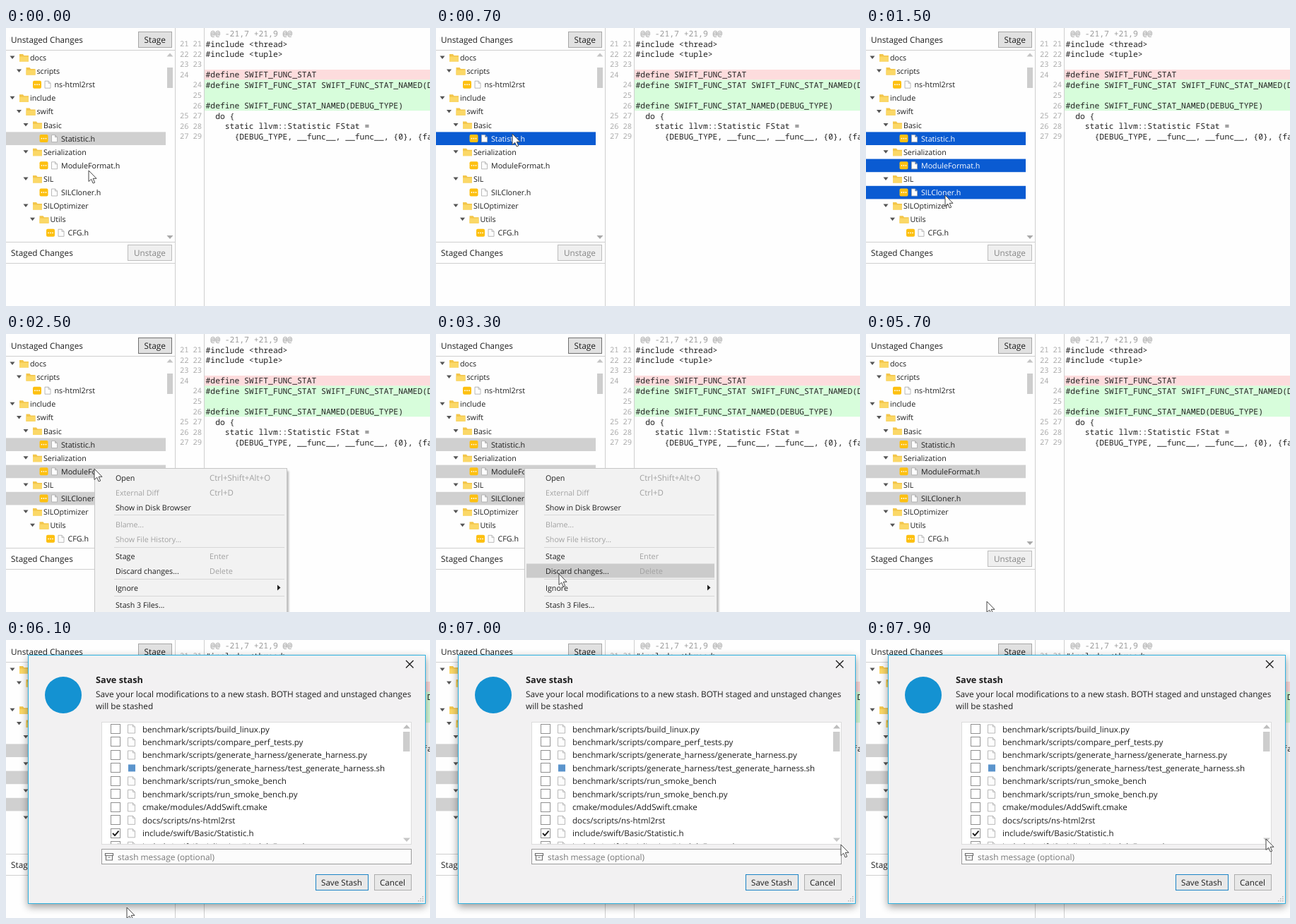
These frames come from a looping animation (600 by 394 pixels, 8 s). An HTML page:

```html
<!DOCTYPE html>
<html lang="en">
<head>
<meta charset="utf-8">
<title>Stash selected files</title>
<style>
html, body { margin: 0; width: 100%; height: 100%; overflow: hidden; background: #fff; }
svg { display: block; width: 600px; height: 394px; }
text { font-family: "Open Sans", "Noto Sans", sans-serif; white-space: pre; text-rendering: geometricPrecision; }
.mono { font-family: "Noto Sans Mono", "DejaVu Sans Mono", monospace; }
svg * { animation: 8s step-end infinite; }

.Statistic { animation-name: pick1; }
.ModuleFormat { animation-name: pick2; }
.SILCloner { animation-name: pick3; }
.menu { animation-name: menu; }
.hover { animation-name: hover; }
.dialog { animation-name: dialog; }
.stage { animation-name: stage; }
.cursor { animation-name: cursor; }

@keyframes pick1 {
  0%, 27.5%, 100% { color: #d0d0d0; fill: #1e1e1e; }
  8.75% { color: #0a5bd2; fill: #fff; }
}
@keyframes pick2 {
  0%, 100% { color: transparent; fill: #1e1e1e; }
  13.75% { color: #0a5bd2; fill: #fff; }
  27.5% { color: #d0d0d0; fill: #1e1e1e; }
}
@keyframes pick3 {
  0%, 100% { color: transparent; fill: #1e1e1e; }
  17.5% { color: #0a5bd2; fill: #fff; }
  27.5% { color: #d0d0d0; fill: #1e1e1e; }
}
@keyframes menu {
  0%, 67.5%, 100% { visibility: hidden; }
  27.5% { visibility: visible; }
}
@keyframes stage {
  0%, 67.5%, 100% { stroke: #a6a6a6; }
  27.5% { stroke: #707070; }
}
@keyframes dialog {
  0% { visibility: hidden; }
  72.5%, 100% { visibility: visible; }
}
/* the menu bar follows the pointer; disabled items do not light up */
@keyframes hover {
  0%, 33.75%, 36.25% { transform: translateY(-400px); }
  32.5% { transform: translateY(194px); }
  35% { transform: translateY(236px); }
  38.75% { transform: translateY(304.5px); }
  40% { transform: translateY(325.5px); }
  46.25% { transform: translateY(349.5px); }
  50%, 100% { transform: translateY(373.5px); }
}
@keyframes cursor {
  0% { transform: translate(117px, 202px); animation-timing-function: steps(6); }
  7.5% { transform: translate(108px, 150px); }
  11.25% { transform: translate(108px, 150px); animation-timing-function: steps(2); }
  13.75% { transform: translate(111px, 196px); }
  15% { transform: translate(111px, 196px); animation-timing-function: steps(2); }
  17.5% { transform: translate(112px, 237px); }
  20% { transform: translate(112px, 237px); animation-timing-function: steps(3); }
  23.75% { transform: translate(125px, 191px); }
  31.25% { transform: translate(125px, 191px); animation-timing-function: steps(7); }
  40% { transform: translate(174px, 340px); }
  41.25% { transform: translate(174px, 340px); animation-timing-function: steps(3); }
  45% { transform: translate(173px, 347px); animation-timing-function: steps(5); }
  51.25% { transform: translate(171px, 379px); }
  77.5% { transform: translate(171px, 379px); animation-timing-function: steps(3); }
  81.25% { transform: translate(310px, 350px); animation-timing-function: steps(5); }
  87.5% { transform: translate(573px, 290px); }
  88.75% { transform: translate(573px, 290px); animation-timing-function: steps(4); }
  93.75% { transform: translate(567px, 283px); }
  95% { transform: translate(567px, 283px); animation-timing-function: steps(3); }
  98.75%, 100% { transform: translate(566px, 282px); }
}
</style>
</head>
<body>
<script>
const text = (x, y, s, size, fill, more = '') =>
  `<text x="${x}" y="${y}" font-size="${size}" ${fill ? `fill="${fill}"` : ''} ${more}>${s.replace(/</g, '&lt;')}</text>`;
const rect = (x, y, w, h, fill, more = '') =>
  `<rect x="${x}" y="${y}" width="${w}" height="${h}" fill="${fill}" ${more}/>`;
const box = (x, y, w, h, fill, stroke, more = '') =>
  rect(x + .5, y + .5, w - 1, h - 1, fill, `stroke="${stroke}" ${more}`);
const path = (d, fill, more = '') => `<path d="${d}" fill="${fill}" ${more}/>`;
const page = (x, y, w, h) =>
  path(`M${x} ${y}h${w - 3}l3 3v${h - 3}h${-w}zM${x + w - 3} ${y}v3h3`, '#fdfdfd', 'stroke="#a9a9a9" stroke-width=".8"');

const INK = '#1e1e1e', DIM = '#a2a2a2';

// file tree
const tree = [
  [0, 'docs'], [1, 'scripts'], [2, 'ns-html2rst', 1], [0, 'include'], [1, 'swift'],
  [2, 'Basic'], [3, 'Statistic.h', 1], [2, 'Serialization'], [3, 'ModuleFormat.h', 1],
  [2, 'SIL'], [3, 'SILCloner.h', 1], [2, 'SILOptimizer'], [3, 'Utils'], [4, 'CFG.h', 1]
];

function treeRow([depth, name, file], i) {
  const y = 42 + 19.1 * i, x = 19 + 9.5 * depth;
  if (!file) {
    return path(`M${x - 13.5} ${y - 2.5}h7l-3.5 4.5z`, '#555') +
      path(`M${x} ${y - 5}h5l1.5 2h6.5v8.5h-13z`, '#f3c64b') +
      rect(x, y - 1.5, 13, 7, '#fbd867') +
      text(x + 15, y + 4, name, 10.7, INK);
  }
  const dots = [3, 6, 9].map(d => `<circle cx="${x + d}" cy="${y}" r=".9" fill="#fff"/>`).join('');
  return `<g class="${name.split('.')[0]}" fill="${INK}" color="transparent">` +
    rect(0, y - 9.2, 226, 18.6, 'currentColor') +
    rect(x, y - 5.5, 12, 11, '#fdc010', 'rx="2"') + dots +
    page(x + 17, y - 5, 8, 10) +
    text(x + 30.5, y + 4, name, 10.7) + '</g>';
}

const left =
  text(7, 21, 'Unstaged Changes', 11.7, INK) +
  box(187, 5, 48, 23, '#e1e1e1', '#a6a6a6', 'class="stage"') +
  text(195.5, 21, 'Stage', 11.9, INK) +
  rect(0, 31, 239, 1, '#cfcfcf') +
  tree.map(treeRow).join('') +
  path('M227.5 40.5h9l-4.5-5z', '#c4c4c4') +
  rect(228, 56, 8, 29, '#cdcdcd') +
  path('M227.5 294h9l-4.5 5z', '#a9a9a9') +
  rect(0, 303, 239, 1, '#cfcfcf') +
  text(7, 323, 'Staged Changes', 11.8, INK) +
  box(172, 307, 63, 23, '#efefef', '#bdbdbd') +
  text(181, 323, 'Unstage', 11.7, '#858585') +
  rect(0, 333, 239, 1, '#cfcfcf') +
  rect(239, 0, 1, 394, '#cfcfcf');

// diff
const code = [
  ['', '', ' @@ -21,7 +21,9 @@'],
  [21, 21, '#include <thread>'],
  [22, 22, '#include <tuple>'],
  [23, 23, ''],
  [24, '', '#define SWIFT_FUNC_STAT'],
  ['', 24, '#define SWIFT_FUNC_STAT SWIFT_FUNC_STAT_NAMED(DEBUG_TYPE)'],
  ['', 25, ''],
  ['', 26, '#define SWIFT_FUNC_STAT_NAMED(DEBUG_TYPE)'],
  [25, 27, '  do {'],
  [26, 28, '    static llvm::Statistic FStat ='],
  [27, 29, '      {DEBUG_TYPE, __func__, __func__, {0}, {false}};']
];
const diff =
  rect(281, 59, 319, 14.6, '#fddcdd') +
  rect(281, 73.4, 319, 43.8, '#d7fddb') +
  rect(280, 0, 1, 394, '#cfcfcf') +
  code.map(([a, b, s], i) => {
    const y = 12 + 14.58 * i;
    return text(246, y - .5, String(a), 10.6, '#adadad', 'class="mono"') +
      text(264.5, y - .5, String(b), 10.6, '#adadad', 'class="mono"') +
      text(282.5, y, s, 11.37, i ? '#222' : '#9a9a9a', 'class="mono"');
  }).join('');

// context menu: baseline, label, shortcut, disabled
const items = [
  [208, 'Open', 'Ctrl+Shift+Alt+O'], [229, 'External Diff', 'Ctrl+D', 1], [250, 'Show in Disk Browser', ''],
  [274, 'Blame...', '', 1], [295, 'Show File History...', '', 1],
  [318.5, 'Stage', 'Enter'], [340, 'Discard changes...', 'Delete'],
  [363.5, 'Ignore', ''], [387.5, 'Stash 3 Files...', '']
];
const menu = '<g class="menu" visibility="hidden">' +
  rect(129, 194, 271, 210, '#000', 'opacity=".28" filter="url(#soft)"') +
  box(125, 190, 273, 220, '#f2f2f2', '#c6c6c6') +
  rect(128, 0, 266, 20, '#cbcbcb', 'class="hover"') +
  [256, 302, 347, 371].map(y => rect(153, y, 241, 1, '#d7d7d7')).join('') +
  items.map(([y, label, keys, off]) =>
    text(155, y, label, 10.7, off ? DIM : INK) +
    text(288, y, keys, keys.includes('+') ? 11.5 : 10.9, DIM)).join('') +
  path('M384 355.5l4.5 4-4.5 4z', INK) + '</g>';

// stash dialog
const bench = 'benchmark/scripts/';
const files = [
  bench + 'build_linux.py', bench + 'compare_perf_tests.py',
  bench + 'generate_harness/generate_harness.py', bench + 'generate_harness/test_generate_harness.sh',
  bench + 'run_smoke_bench', bench + 'run_smoke_bench.py',
  'cmake/modules/AddSwift.cmake', 'docs/scripts/ns-html2rst',
  'include/swift/Basic/Statistic.h', 'include/swift/Serialization/ModuleFormat.h'
];

function fileRow(name, i) {
  const y = 126 + 18.48 * i;
  return box(148, Math.round(y) - 7, 14, 14, '#fff', '#909090') +
    (i > 7 ? path(`M151 ${y}l3 3.2 5.5-6.5`, 'none', `stroke="${INK}" stroke-width="2"`) : '') +
    (name.endsWith('.sh') ? rect(173, y - 5, 10, 10, '#5b94cc') : page(172.5, y - 6, 10, 12)) +
    text(193, y + 4.5, name, 11.6, INK);
}

let grip = '';
for (let r = 0; r < 3; r++)
  for (let c = 0; c <= r; c++) grip += rect(589 - 3 * c, 363 + 3 * r, 1.5, 1.5, '#b4b4b4');

const dialog = '<g class="dialog" visibility="hidden">' +
  rect(31, 25, 563, 353, '#000', 'opacity=".4" filter="url(#wide)"') +
  box(31, 21, 563, 353, '#f2f1f2', '#2fb2e0') +
  '<circle cx="81" cy="78" r="26" fill="#1492d2"/>' +
  path('M566 29l10.5 10.5M576.5 29l-10.5 10.5', 'none', `stroke="${INK}" stroke-width="1.4"`) +
  text(127, 61, 'Save stash', 12.7, INK, 'font-weight="700"') +
  text(127, 81, 'Save your local modifications to a new stash. BOTH staged and unstaged changes', 11.8, INK) +
  text(127, 97.5, 'will be stashed', 11.8, INK) +
  box(135, 116, 439, 174, '#fff', '#dcdcdc') +
  '<g clip-path="url(#list)">' + files.map(fileRow).join('') + '</g>' +
  path('M562 125.5h10l-5-5.5z', '#bdbdbd') +
  rect(562, 130, 9.5, 28, '#cdcdcd') +
  path('M562 280.5h10l-5 5.5z', '#c6c6c6') +
  box(135, 296, 439, 22, '#fcfcfc', '#9c9c9c') +
  path('M140.5 302.5h11v3h-11zM141.5 305.5v6.5h9v-6.5M144.5 308h3', 'none', 'stroke="#707070" stroke-width="1.2"') +
  text(158, 311.5, 'stash message (optional)', 11.88, '#777') +
  box(438, 332, 75, 23, '#e8e8e8', '#1c84c6') +
  text(446, 347.5, 'Save Stash', 11.65, INK) +
  box(521, 332, 53, 23, '#e8e8e8', '#adadad') +
  text(529, 347.5, 'Cancel', 11.65, INK) +
  grip + '</g>';

const cursor = path('M0 0V15.5L3.7 12.2L6.2 18L8.7 17L6.2 11.3H11Z', '#fff',
  'class="cursor" stroke="#444" stroke-width="1"');

document.body.innerHTML = `<svg viewBox="0 0 600 394">
<defs>
<filter id="soft"><feGaussianBlur stdDeviation="1.5"/></filter>
<filter id="wide"><feGaussianBlur stdDeviation="6"/></filter>
<clipPath id="list">${rect(136, 117, 437, 172, '#000')}</clipPath>
</defs>${rect(0, 0, 600, 394, '#fefefe')}${left}${diff}${menu}${dialog}${cursor}</svg>`;
</script>
</body>
</html>
```
